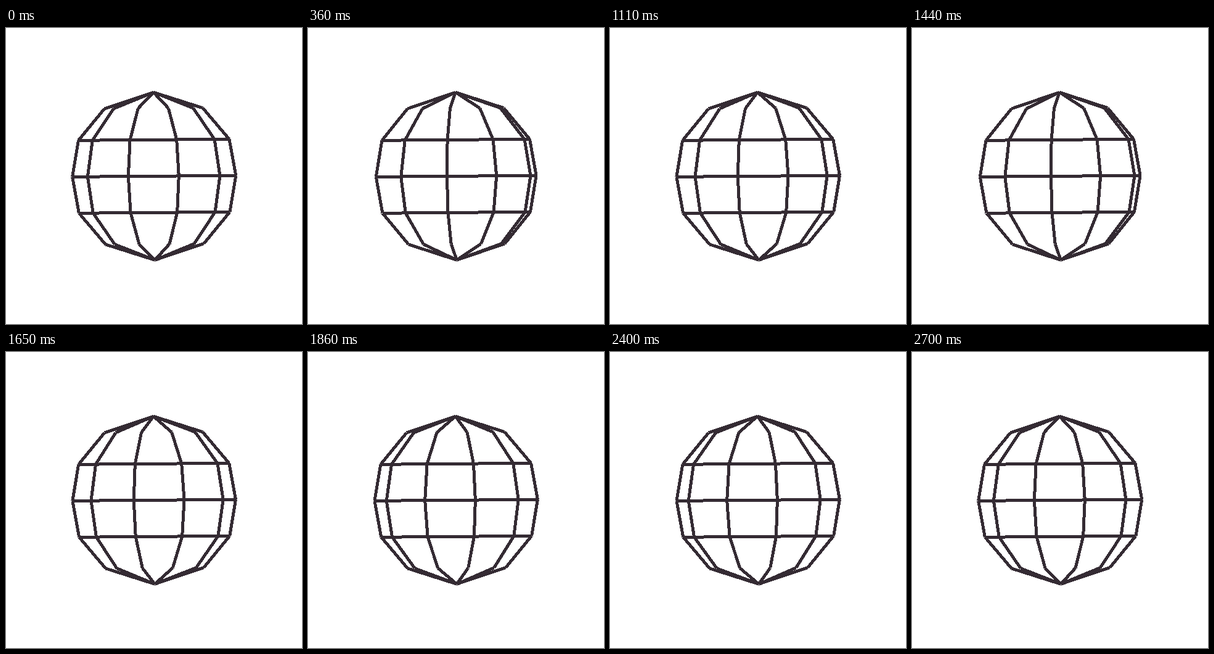
An HTML page for the animation above (2730 ms loop, 480 by 480 pixels).

```html
<!DOCTYPE html>
<html lang="en">
<head>
<meta charset="utf-8">
<title>Spinning wire globe</title>
<style>
  html, body { margin: 0; width: 100%; height: 100%; overflow: hidden; background: #fff; }
  svg { display: block; width: 100%; height: 100%; }
</style>
</head>
<body>
<svg viewBox="0 0 480 480">
  <path id="globe" fill="none" stroke="#342b33" stroke-width="5" shape-rendering="crispEdges"/>
</svg>
<script>
const STEP = 30, LOOP = 2730, TURN = 2700;
const SIDES = 10, GAP = 360 / SIDES;
const PHASE = -18.4, ROLL = -0.008;
const CX = 240.2, CY = 240.3;

// Profile from pole to pole: radius, height, whether a parallel is drawn
const rings = [
  [0, -136, false], [79.7, -110, false], [122.3, -59, true], [132.6, 0, true],
  [122.3, 59, true], [79.7, 110, false], [0, 136, false]
];

const globe = document.getElementById('globe');
const rad = deg => deg * Math.PI / 180;
const facing = deg => Math.cos(rad(deg)) > 0;

function place([r, y], deg) {
  const x = r * Math.sin(rad(deg));
  const c = Math.cos(ROLL), s = Math.sin(ROLL);
  return (CX + x * c - y * s).toFixed(2) + ' ' + (CY + x * s + y * c).toFixed(2);
}

const line = (a, b) => `M${a}L${b}`;

function draw(time) {
  const tick = Math.floor((time % LOOP) / STEP);
  const spin = PHASE + 360 * tick * STEP / TURN;
  let d = '';
  for (let i = 0; i < SIDES; i++) {
    const deg = spin + i * GAP;
    const next = deg + GAP;
    const right = facing(deg + GAP / 2);
    const left = facing(deg - GAP / 2);
    rings.forEach((ring, k) => {
      if (right && ring[2]) d += line(place(ring, deg), place(ring, next));
      if ((left || right) && k) d += line(place(rings[k - 1], deg), place(ring, deg));
    });
  }
  globe.setAttribute('d', d);
}

const start = performance.now();
function loop() {
  draw(performance.now() - start);
  requestAnimationFrame(loop);
}
loop();
</script>
</body>
</html>
```
